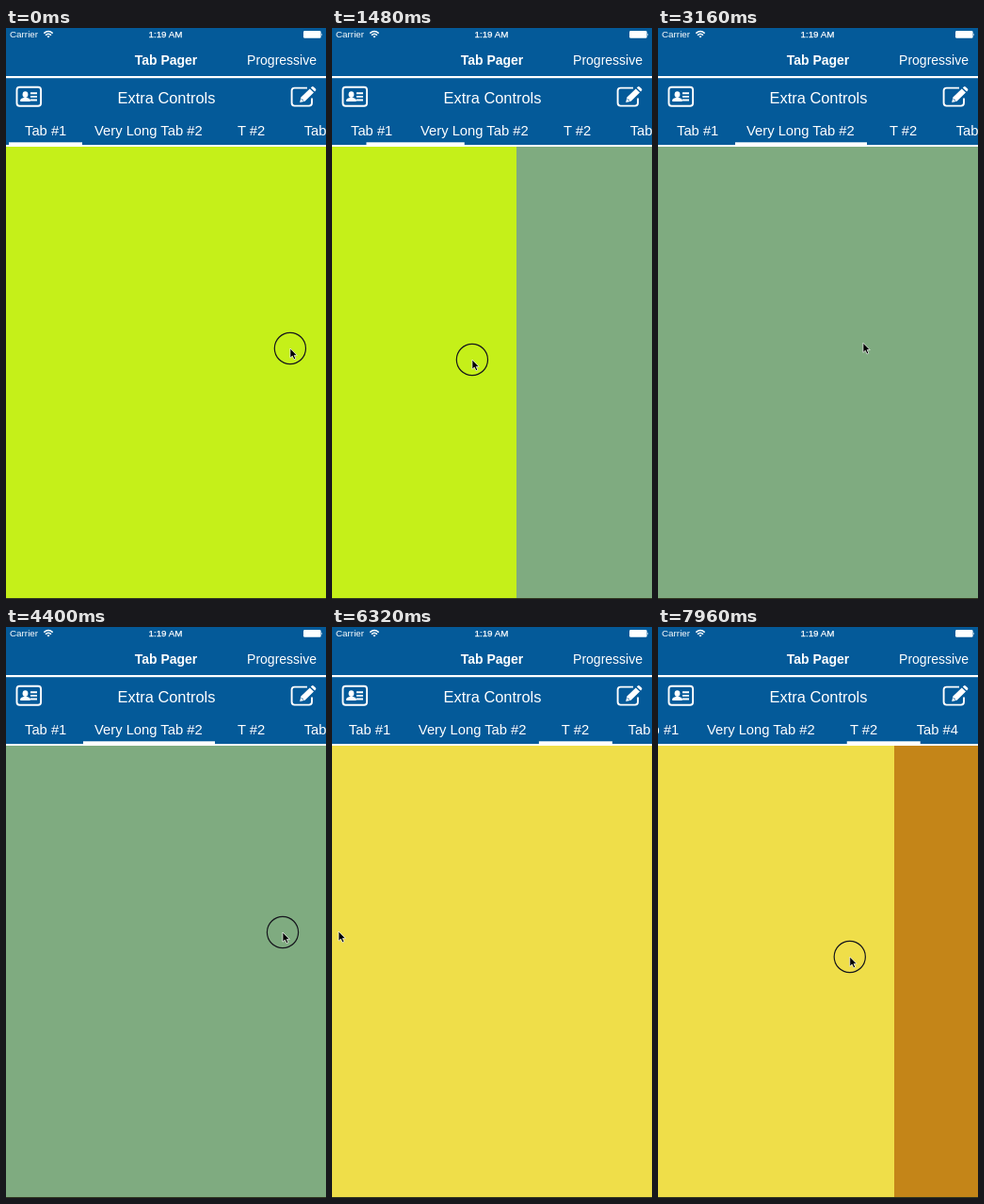
These frames come from a looping animation (340x606 px, 8000 ms). An HTML page:

```html
<!DOCTYPE html>
<html lang="en">
<head>
<meta charset="utf-8">
<title>Tab Pager</title>
<style>
  html, body { margin: 0; width: 100%; height: 100%; overflow: hidden; background: #045a99; }
  svg { display: block; width: 100%; height: 100%; }
  text { font-family: "Liberation Sans", Arial, sans-serif; fill: #fff; }
</style>
</head>
<body>
<svg viewBox="0 0 340 606">
  <g id="pages"></g>
  <rect y="605" width="340" height="1" fill="#30351f"/>

  <rect width="340" height="125" fill="#045a99"/>
  <g id="strip" font-size="14.78">
    <text x="20" y="113.5">Tab #1</text>
    <text x="94" y="113.5">Very Long Tab #2</text>
    <text x="246" y="113.5">T #2</text>
    <text x="316.7" y="113.5">Tab #4</text>
    <rect id="marker" y="121.3" height="2.7" fill="#fff"/>
  </g>
  <rect y="51" width="340" height="2.2" fill="#fff"/>
  <rect y="124" width="340" height="2" fill="#fff"/>

  <text x="4" y="10.4" font-size="9.85">Carrier</text>
  <text x="169.5" y="10.4" font-size="9.85" text-anchor="middle" stroke="#fff" stroke-width=".25">1:19 AM</text>
  <g fill="none" stroke="#fff" stroke-width="1.5">
    <path d="M40.3 5.6Q45 1.4 49.7 5.6M42 7.6Q45 5 48 7.6"/>
    <path d="M43.4 8.8Q45 7.6 46.6 8.8L45 10.6Z" fill="#fff" stroke="none"/>
  </g>
  <rect x="316" y="3" width="18.6" height="7.8" rx="1.4" fill="#fff"/>
  <path d="M335.3 5.4q1.6 1.5 0 3z" fill="#fff"/>

  <text x="170" y="38.5" font-size="14" font-weight="bold" text-anchor="middle">Tab Pager</text>
  <text x="330" y="38.5" font-size="14" text-anchor="end">Progressive</text>
  <text x="170.5" y="79.6" font-size="16.4" text-anchor="middle">Extra Controls</text>

  <g fill="none" stroke="#fff" stroke-width="1.9">
    <rect x="11.5" y="62.8" width="25.6" height="20" rx="3"/>
    <path d="M26 69.3h7M26 72.9h7M26 76.5h7"/>
    <g fill="#fff" stroke="none">
      <ellipse cx="20.5" cy="70.6" rx="2.9" ry="3.4"/>
      <path d="M15.2 78v-1.4q.2-2 3.6-2.6h3.4q3.4.6 3.6 2.6V78z"/>
    </g>
    <path d="M320 63.6h-13.4q-3 0-3 3v13q0 3 3 3h15.4q3 0 3-3v-5"/>
    <path d="M312.2 79l1.2-5.4 9.4-9.2 4.2 4.2-9.4 9.2zM323.8 63.4l1-1q1-.8 2 0l2.2 2.2q.8 1 0 2l-1 1z" fill="#fff" stroke="none"/>
    <path d="M313.8 75.2l2.2 2.2" stroke="#045a99" stroke-width="1"/>
  </g>

  <g id="pointer">
    <circle id="ring" r="16.6" fill="none" stroke="#15151c" stroke-width="1.2"/>
    <path d="M0 0V10.2L2.4 8.1L4.1 11.8L5.9 11L4.3 7.4H7.3Z" fill="#000" stroke="#fff" stroke-width=".7" stroke-linejoin="round"/>
  </g>
</svg>
<script>
const LOOP = 8000, W = 340;
const $ = id => document.getElementById(id);
const clamp = v => Math.min(1, Math.max(0, v));
const smooth = u => u * u * (3 - 2 * u);

const colors = ['#c5f019', '#7fab80', '#efde49', '#c48518'];
const tabs = [[3, 78], [82, 140], [222, 78], [301, 78]];  // left, width

// Pointer keys: time, x, y
const keys = [
  [0, 302, 340], [700, 232, 347], [1480, 149, 352], [2480, 72.6, 351], [2640, 72.6, 351],
  [3500, 294, 325], [4400, 294, 324], [4800, 228, 328], [5280, 132, 331], [5900, 7, 323],
  [6480, 7, 323], [7320, 301, 348], [7500, 301, 348], [7960, 204, 350], [8000, 194, 350]
];

// Drags: press, release, start x, slop before the page follows
const drags = [
  { down: 0, up: 2480, x: 302, slop: 9 },
  { down: 4340, up: 5900, x: 294, slop: 8 },
  { down: 7480, up: 9000, x: 301, slop: 8 }
];
const SNAP = 400;

// Monotone cubic through the keys
function track(t, c) {
  let i = 0;
  while (i < keys.length - 2 && t >= keys[i + 1][0]) i++;
  const rate = k => (keys[k + 1][c] - keys[k][c]) / (keys[k + 1][0] - keys[k][0]);
  const slope = k => {
    if (k === 0) return rate(0);
    if (k === keys.length - 1) return rate(k - 1);
    const a = rate(k - 1), b = rate(k);
    return a * b > 0 ? 2 * a * b / (a + b) : 0;
  };
  const h = keys[i + 1][0] - keys[i][0], u = (t - keys[i][0]) / h, s = smooth(u);
  return keys[i][c] * (1 - s) + keys[i + 1][c] * s
    + h * u * (1 - u) * (slope(i) * (1 - u) - slope(i + 1) * u);
}

function pagePosition(t) {
  let pos = 0;
  for (const d of drags) {
    if (t < d.down) break;
    const moved = Math.max(0, d.x - d.slop - track(Math.min(t, d.up), 1)) / W;
    const snap = 1 - (1 - clamp((t - d.up) / SNAP)) ** 3;
    pos += moved + (1 - moved) * snap;
  }
  return pos;
}

const pages = colors.map(fill => {
  const r = document.createElementNS('http://www.w3.org/2000/svg', 'rect');
  for (const [k, v] of Object.entries({ y: 125, width: W, height: 480, fill })) r.setAttribute(k, v);
  return $('pages').appendChild(r);
});

function draw(t) {
  const pos = pagePosition(t);
  pages.forEach((r, i) => r.setAttribute('x', Math.round((i - pos) * W)));

  const i = Math.min(2, Math.floor(pos)), f = pos - i;
  const mix = c => tabs[i][c] + (tabs[i + 1][c] - tabs[i][c]) * f;
  $('marker').setAttribute('x', mix(0));
  $('marker').setAttribute('width', mix(1));
  const scroll = 42 * smooth(clamp((t - 6280) / 300));
  $('strip').setAttribute('transform', `translate(${-scroll})`);

  $('pointer').setAttribute('transform', `translate(${track(t, 1)} ${track(t, 2)})`);
  const pressed = drags.some(d => t >= d.down && t < d.up);
  $('ring').setAttribute('visibility', pressed ? 'visible' : 'hidden');
}

const start = performance.now();
function tick() {
  draw((performance.now() - start) % LOOP);
  requestAnimationFrame(tick);
}
draw(0);
requestAnimationFrame(tick);
</script>
</body>
</html>
```
